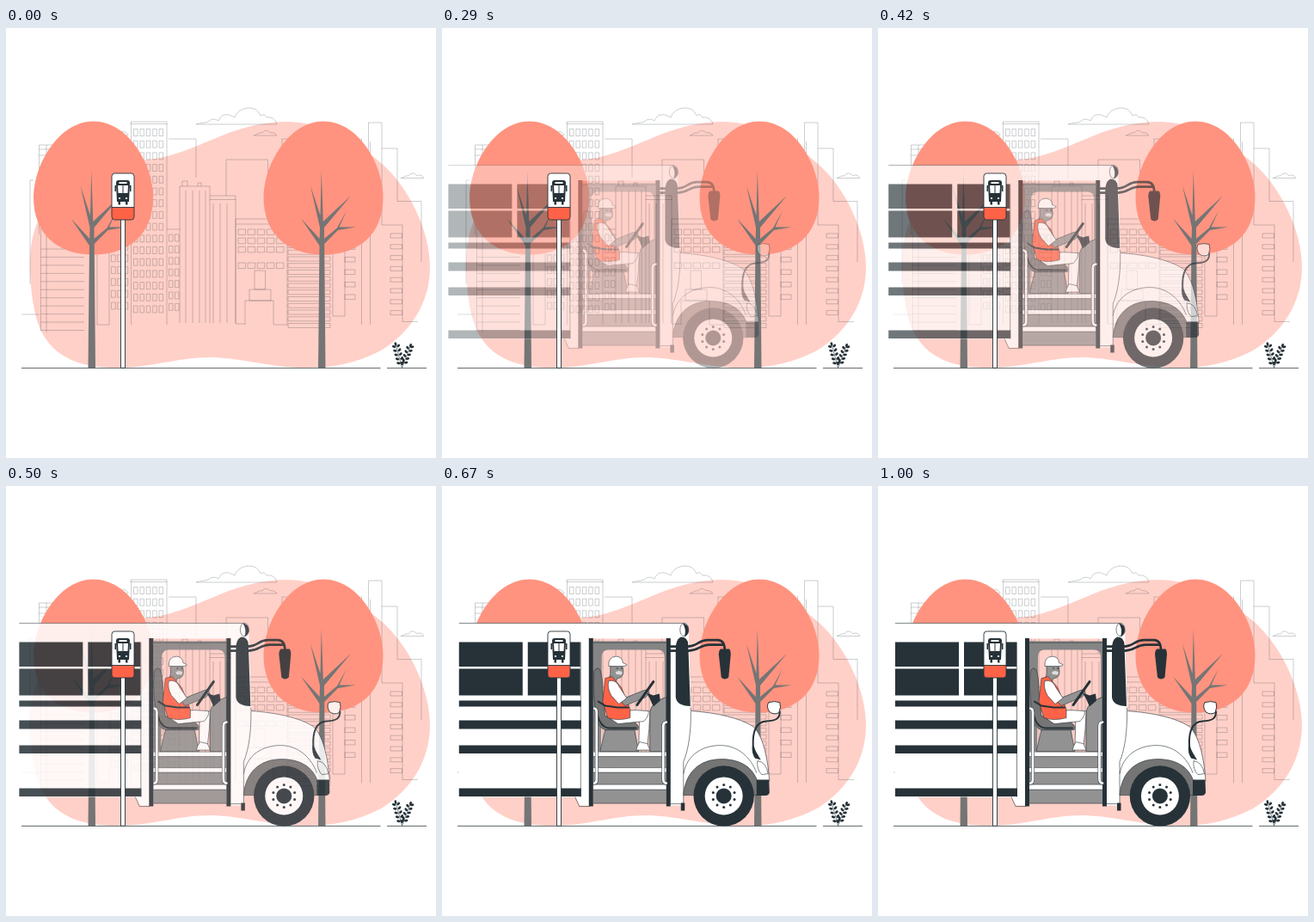
These frames come from a looping animation (500x500 px, 1.04 s). An HTML page:

```html
<!DOCTYPE html>
<html lang="en">
<head>
<meta charset="utf-8">
<title>Bus stop</title>
<style>
html, body { margin: 0; width: 100%; height: 100%; overflow: hidden; background: #fff; }
svg { display: block; width: 100vw; height: 100vh; }
.city { fill: none; stroke: #263238; stroke-width: .55; opacity: .43; }
.dark { fill: #263238; }
.white { fill: #fff; }
.accent { fill: #ff6347; }
.grey { fill: #929292; }
.deep { fill: #757575; }
.line { fill: none; stroke: #263238; stroke-width: .6; }
.edge { stroke: #263238; stroke-width: .6; }
.rod { fill: none; stroke: #263238; stroke-width: 2.6; stroke-linecap: round; }
.rail { fill: none; stroke: #263238; stroke-width: 3.8; stroke-linecap: round; }
.rail + .rail { stroke: #fff; stroke-width: 2.8; }
</style>
</head>
<body>
<svg viewBox="0 0 500 500">
  <defs>
    <g id="tree">
      <path fill="#ff937f" d="M369 108.600C410 108.600 438.500 159 438.500 197C438.500 240 410 263.600 369 263.600C328 263.600 299.500 240 299.500 197C299.500 159 329 108.600 369 108.600Z"/>
      <path class="deep" d="M366.800 166L368.800 225L401 195L370 232L370 245L385 232.500L396 212.500L387.500 231.500L407 231.500L386 235L370.200 251L371.500 395.300H363L364.500 253L343 221.500L364.700 245L365 232L354 183.500L365.500 218Z"/>
    </g>
  </defs>

  <path fill="#ffd0c8" d="M28 282C27 250 33 225 50 200C80 160 130 156 165 153C220 148 260 109 325 109C370 109 408 132 436 157C469 185 493 237 493 278C493 318 472 353 436 375C406 391 376 396 340 395C300 393 270 383 236 383C200 383 170 395 128 395C90 395 60 385 44 358C33 340 29 310 28 282Z"/>
  <path id="city" class="city"/>
  <g class="city">
    <path d="M221 112H315C314 107 310 103 303 104C300 99 298 101 296 102C292 93 286 93 281 93C273 94 268 98 266 104C262 102 258 100 255 101C251 101 249 104 247 108C243 105 238 106 235 109C230 111 226 110 221 112Z"/>
    <path d="M288 125H315C313 122 309 121 307 122C305 119 300 118 298 122C294 121 292 124 288 125ZM459 174.500H486C484 171 480 170 478 172C475 168 470 168 468 172C464 171 462 174 459 174.500ZM130 121C136 119 141 121 142 125H130"/>
  </g>
  <use href="#tree" x="-267.500"/>
  <use href="#tree"/>
  <path class="line" style="stroke-width:.75" d="M18 395.400H435.500M443 395.400H489"/>
  <g id="plant" class="dark"></g>

  <g id="bus">
    <!-- body -->
    <path class="white" fill-rule="evenodd" d="M20 160H280Q286 161 287 170L290 262C320 264 346 270 362 280C373 290 379 315 381 344H366V350H281V372H160L155 362H20ZM172 178V372H266V178Z"/>
    <path class="line" d="M20 160H280Q286 161 287 170M161.500 182V362M155 362L160 373H172M266 370H281M289 258L290 262C320 264 346 270 362 280C373 290 379 315 381 344M289.500 262C290 285 287 307 281 321V370M281 335C285 313 303 302 324 302C345 302 360 317 366 334"/>
    <path class="dark" d="M20 182H94V210.500H20ZM100 182H161V210.500H100ZM20 213H94V244H20ZM100 213H161V244H100ZM20 250H162V257H20ZM20 273H162V283H20ZM20 302H162V311.500H20ZM20 352H162V361.500H20Z"/>

    <!-- doorway -->
    <path fill="#858585" fill-rule="evenodd" d="M176 181H261V309H176ZM185 309H259V199Q259 191 251 191H194Q186 191 186 199Z"/>
    <path class="grey" d="M176 315H261V328H176ZM176 333.500H261V347.500H176ZM176 353.500H261V369.500H176Z"/>
    <path class="white" d="M176 309.500H261V315H176ZM176 328H261V333.500H176ZM176 347.500H261V353.500H176Z"/>
    <path class="line" d="M176 309.500H261M176 315H261M176 328H261M176 333.500H261M176 347.500H261M176 353.500H261M176 369.500H261M176 182.500H261"/>
    <path class="grey edge" d="M242 309V263Q244 251 261 246V309Z"/>

    <!-- seat -->
    <path class="grey edge" d="M190 284H224L229 309H184Z"/>
    <path class="deep edge" d="M177 216Q180 210 184 214Q187 222 187 238L190 268L224 275Q231 280 228 284H190Q182 282 180 270Q175 240 177 216Z"/>
    <path class="rod" style="stroke-width:2" d="M181 266Q184 281 195 282H226"/>

    <!-- driver -->
    <path class="white edge" d="M230 264L242 262L241 283L239 302H229Z"/>
    <path class="white edge" d="M230 298L239 300L242 307.500H226Q227 303 230 298Z"/>
    <path class="white edge" d="M196 271Q208 261 224 261L240 262Q242 266 235 274L205 277Z"/>
    <path class="grey edge" d="M196 209H210L211 216Q211 224 204 224L202 229L194 226L196 219Z"/>
    <path class="white edge" d="M194 210Q193 199 203 198.500Q210 199 210.500 206L215 208Q215 210 211 210Z"/>
    <path fill="#ddd" d="M202 217Q206 214 210 217L209 220L203 219.500Z"/>
    <path class="dark" d="M203 212h2v1h-2zM208 212h2v1h-2z"/>
    <path class="accent edge" d="M190 224L198 222L209 235L219 260V270Q205 274 193 270L187 251Z"/>
    <path class="grey edge" d="M206 248L215 246L235 238Q241 236 241 242L237 246L213 256Z"/>
    <path class="white edge" d="M194 227Q203 225 207 235L215 247L206 254L197 244Q192 235 194 227Z"/>
    <path class="rod" style="stroke-width:2" d="M182 251L190 256L204 258H217"/>
    <path class="rod" style="stroke-width:3" d="M246 228L227 255"/>
    <path class="dark" d="M238 241L246 244L253 242L254 250L246 257L242 248Z"/>

    <!-- door posts and rails -->
    <path class="rail" d="M177 259Q180 259 180 264V342Q180 346 177 346"/>
    <path class="rail" d="M177 259Q180 259 180 264V342Q180 346 177 346"/>
    <path class="dark" d="M171 177.500H176V373H171ZM261 177.500H266V373H261ZM278 369H282.500V378H278Z"/>
    <path class="rail" d="M261 275Q257.500 275 257.500 280V341Q257.500 346 261 346"/>
    <path class="rail" d="M261 275Q257.500 275 257.500 280V341Q257.500 346 261 346"/>

    <!-- windscreen and mirrors -->
    <path class="dark" d="M278 176Q272 179 272 190V246Q273 256 289 256.500L286.500 185Q286 176 278 176Z"/>
    <ellipse class="white edge" cx="282" cy="167.500" rx="5" ry="7.800"/>
    <path class="dark" d="M280 159.800Q287 161 287 167.500Q287 174 282 175.300Q285 167 280 159.800Z"/>
    <path class="rod" d="M266 187H285C298 187 298 179.500 309 179.500H321Q329 180 329 191M266 192H287C299 192 300 185 311 185H326"/>
    <path class="dark" d="M324 190H334.500Q336 192 336 196L333.500 223Q329 227 325 223L322 196Q322 192 324 190Z"/>

    <!-- front end -->
    <path class="deep edge" d="M281 360C283 333 300 318 325 318C348 318 362 328 367 344V360Z"/>
    <path class="dark" d="M366 342H380.500L381 357Q380 360.500 376 360.500H366Z"/>
    <path class="white edge" d="M367 320Q377 321 379.500 335L372 336Q366 330 367 320Z"/>
    <path class="rod" style="stroke-width:2" d="M366 316L362 303C361 284 367 275 377 274C389 273 393 271 393 263"/>
    <path class="dark" d="M361 302L371 319L364 317Q360 311 361 302Z"/>
    <path class="white" stroke="#263238" d="M380 252Q387 250 393 252Q395 257 392 264Q386 267 381 263Q377 257 380 252Z"/>
    <g transform="translate(327.900 360.800)">
      <circle class="dark" r="35.200"/>
      <circle class="white" r="22"/>
      <circle class="dark" r="9"/>
      <g id="bolts" class="dark"></g>
    </g>
  </g>

  <!-- stop sign -->
  <path class="white edge" style="stroke-width:.9" d="M133.500 222H138.500V395.300H133.500Z"/>
  <rect class="white" x="123" y="169" width="26" height="54" rx="3.500"/>
  <path class="accent" d="M123 208.500H149V219.500Q149 223 145.500 223H126.500Q123 223 123 219.500Z"/>
  <path class="line" style="stroke-width:.9" d="M123 208.500H149"/>
  <rect class="line" style="stroke-width:.9" x="123" y="169" width="26" height="54" rx="3.500"/>
  <path class="dark" d="M131 177H141Q144 177 144 180L143 202H141.500V205.500H139V202H133V205.500H130.500V202H129L128 180Q128 177 131 177ZM126.500 183H128V190H126.500ZM144 183H145.500V190H144Z"/>
  <path class="white" d="M131.500 179H140.500V181H131.500ZM130 183H135.500V192H130.500ZM136.500 183H142L141.500 192H136.500ZM131 197H133V199H131ZM139 197H141V199H139Z"/>
</svg>
<script>
const byId = id => document.getElementById(id);

// City outlines
const box = (x, y, w, h) => `M${x} ${y}h${w}v${h}h${-w}z`;
const grid = (x, y, cols, rows, dx, dy, w, h) => {
  let d = '';
  for (let r = 0; r < rows; r++)
    for (let c = 0; c < cols; c++) d += box(x + c * dx, y + r * dy, w, h);
  return d;
};
const posts = (xs, top, bottom) => xs.map(x => `M${x} ${top}V${bottom}`).join('');
const floors = (x1, x2, y, rows, dy) =>
  Array.from({ length: rows }, (_, i) => `M${x1} ${y + i * dy}H${x2}`).join('');

byId('city').setAttribute('d', [
  'M38.500 240V136H70M38.500 141H70M38.500 148H62M32 177H28V298M18 333H38.500',
  posts([47], 136, 354), posts([40.500], 225, 352), floors(40.500, 91, 257, 11, 9.450),
  'M106 240V345H120V240', grid(122.500, 250, 3, 6, 7.200, 13.800, 4.800, 8),
  box(145, 109, 42, 2.500), posts([145.500, 187], 111, 345),
  grid(148.500, 117.500, 5, 16, 7.400, 13.700, 4.500, 8),
  'M189 129H221V174',
  'M187 234H202', grid(189.500, 240, 2, 7, 7, 13.400, 4.500, 8),
  'M202 343V184H237V195M205 184V178H211V184M223 184V180H227V184',
  posts([209, 217, 225, 232], 189, 343),
  box(237, 195, 30, 4.500), posts([237, 267], 199, 343), posts([241, 249, 257], 204, 343),
  'M256 195V153H304.500V222',
  'M267 222H327V345H311M267 228H327M267 222V344H278',
  grid(270, 234, 5, 3, 11.100, 10.200, 8.500, 6.500), grid(270, 273, 5, 1, 11.100, 1, 8.500, 6.500),
  box(289, 282, 12.500, 22), box(283, 304, 25, 13), 'M278 345V317H311V345',
  'M321 160V129H335', grid(328, 235, 1, 15, 1, 7.750, 49, 5),
  'M380 250V335H394V250', grid(394, 252, 1, 5, 1, 14.500, 12, 5.500),
  'M421.500 150V110H437V229', posts([413.500], 128, 345), posts([423.500], 132, 345),
  'M437 140H455V201.500H483V272',
  'M437 229H461V341.500H479', grid(447, 239, 1, 8, 1, 12.800, 13.500, 5)
].join(''));

// Leafy sprigs
const sprig = (tipX, tipY, tilt) => {
  const rootX = 460.500, rootY = 395, rows = 5;
  let out = `<path class="line" d="M${rootX} ${rootY}L${tipX} ${tipY}"/>`;
  const leaf = (x, y, turn) =>
    `<ellipse cx="${x}" cy="${y}" rx="2.200" ry="1.400" transform="rotate(${turn} ${x} ${y})"/>`;
  for (let i = 0; i < rows; i++) {
    const k = (i + .5) / (rows + .7);
    const x = tipX + (rootX - tipX) * k, y = tipY + (rootY - tipY) * k;
    out += leaf(x - 2.600, y + .500, 30 + tilt) + leaf(x + 2.600, y - .500, -30 + tilt);
  }
  return out + leaf(tipX, tipY, 90 + tilt);
};
byId('plant').innerHTML = sprig(453, 367.500, -14) + sprig(470.500, 369, 18);

byId('bolts').innerHTML = Array.from({ length: 10 }, (_, i) => {
  const a = (i + .5) * Math.PI / 5;
  return `<circle cx="${13 * Math.cos(a)}" cy="${13 * Math.sin(a)}" r="1.500"/>`;
}).join('');

// Motion: slide in with a slight overshoot while fading in a little faster
const LOOP = 1040, FPS = 24, SLIDE = 18.2, FADE = 1.15;
const cubic = (a, b, u) => 3 * u * (1 - u) ** 2 * a + 3 * u * u * (1 - u) * b + u ** 3;
const ease = x => {
  let low = 0, high = 1;
  for (let i = 0; i < 24; i++) {
    const mid = (low + high) / 2;
    if (cubic(.36, .5, mid) < x) low = mid; else high = mid;
  }
  return cubic(-.01, 1.38, (low + high) / 2);
};

const bus = byId('bus');
function render(ms) {
  const step = Math.min(FPS, Math.floor(ms % LOOP * FPS / 1000 + .15));
  const p = step ? ease(step / FPS) : 0;
  bus.setAttribute('transform', `translate(${SLIDE * (p - 1)} -.4)`);
  bus.setAttribute('opacity', Math.max(0, Math.min(1, p * FADE)));
}

const start = performance.now();
function tick() {
  render(performance.now() - start);
  requestAnimationFrame(tick);
}
tick();
</script>
</body>
</html>
```
